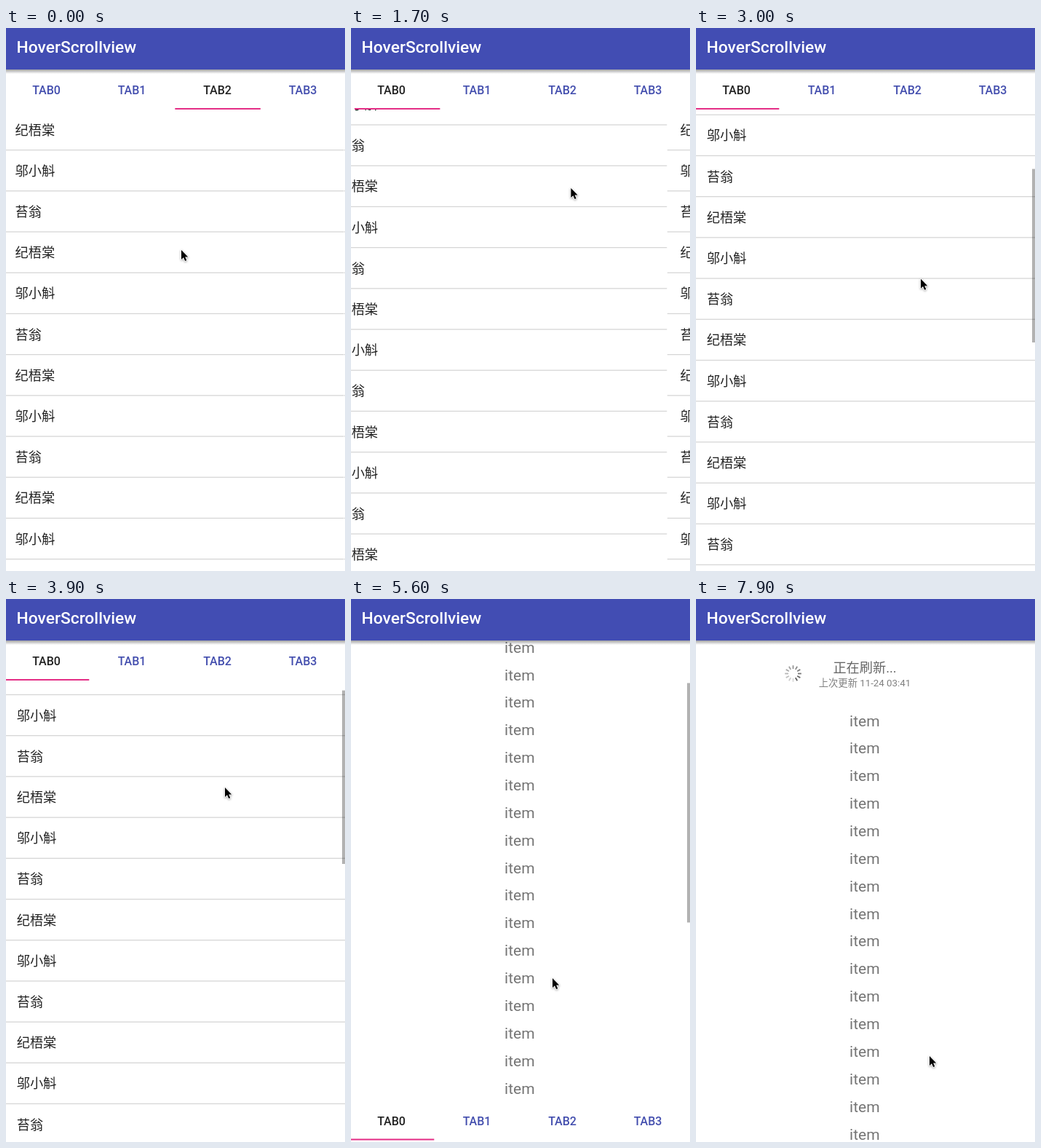
An HTML page with a canvas that plays this animation: 466 px wide and 746 px high, repeating every 8000 ms.

```html
<!DOCTYPE html>
<html lang="zh-CN">
<head>
<meta charset="utf-8">
<title>HoverScrollview</title>
<style>
  html, body { margin: 0; width: 100%; height: 100%; overflow: hidden; background: #fff; }
  canvas { display: block; width: 466px; height: 746px; }
</style>
</head>
<body>
<canvas id="stage" width="466" height="746"></canvas>
<script>
const W = 466, H = 746, LOOP = 8000, STEP = 100;
const BAR_H = 57, LIST_TOP = 112, ROW_H = 56.2, ROWS = 30;
const ITEM_H = 37.87, ITEMS = 20, MAX_SCROLL = 754;
const TAB_W = 117.5, PAGE_W = 470, EDGE = -3.2, REFRESH_H = 92;
const NAMES = ['纪梧棠', '邬小斛', '苔翁'];
const LATIN = 'Roboto, sans-serif';
const CJK = 'Roboto, "Noto Sans CJK SC", "Noto Sans CJK", sans-serif';

const ctx = document.getElementById('stage').getContext('2d');

// Progress from 0 to 1 between two times.
const linear = u => u;
const smooth = u => u * u * (3 - 2 * u);
const fling = u => 1 - (1 - u) ** 3;
function ramp(t, from, to, ease = linear) {
  return ease(Math.min(1, Math.max(0, (t - from) / (to - from))));
}

// Swipes move one page back each.
const pagerPosition = t =>
  3 - ramp(t, -600, 25, smooth) - ramp(t, 300, 900, smooth) - ramp(t, 1175, 1800, smooth);

const listScroll = t => 428 - 211 * ramp(t, 2100, 2800, fling) - 217 * ramp(t, 3300, 4020);

const outerScroll = t => MAX_SCROLL - 383 * ramp(t, 4000, 5000, fling)
  - 300 * ramp(t, 5200, 6100, fling) - 71 * ramp(t, 6300, 6500);

const pullDistance = t => 125 * ramp(t, 6500, 6900)
  - (125 - REFRESH_H) * ramp(t, 6900, 7200, fling);

const barAlpha = (t, shown, fading) => ramp(t, shown - 100, shown) * (1 - ramp(t, fading, fading + 280));

// Where the pointer presses and lets go: time, x, y.
const POINTER = [
  [0, 241, 304], [300, 150, 285], [700, 325, 250], [1200, 174, 254], [1800, 328, 212],
  [2100, 341, 190], [2400, 320, 367], [2900, 312, 425], [3300, 300, 100], [3900, 301, 258],
  [4500, 302, 575], [5200, 270, 340], [5600, 277, 520], [6300, 305, 330], [6900, 321, 627]
];

function pointerAt(t) {
  let [, x, y] = POINTER[0];
  for (let i = 1; i < POINTER.length; i++) {
    const [from, x0, y0] = POINTER[i - 1], [to, x1, y1] = POINTER[i];
    const u = ramp(t, from, to);
    x += (x1 - x0) * u;
    y += (y1 - y0) * u;
  }
  return [x, y];
}

function text(string, x, y, font, color, align = 'left') {
  ctx.font = font;
  ctx.fillStyle = color;
  ctx.textAlign = align;
  ctx.fillText(string, x, y);
}

function rect(x, y, w, h, color) {
  ctx.fillStyle = color;
  ctx.fillRect(x, y, w, h);
}

function scrollbar(x, top, view, content, scroll, alpha) {
  rect(x, top + scroll * view / content, 4, view * view / content, `rgba(0,0,0,${0.3 * alpha})`);
}

function drawList(page, shift, dx, t) {
  const top = LIST_TOP + shift, view = H - LIST_TOP;
  const scroll = page === 0 ? listScroll(t) : 0;
  ctx.save();
  ctx.beginPath();
  ctx.rect(dx + EDGE, top, PAGE_W, view);
  ctx.clip();
  for (let i = 0; i < ROWS; i++) {
    const y = top + i * ROW_H - scroll;
    text(NAMES[i % NAMES.length], 14.7 + dx, y + 34.6, `18.2px ${CJK}`, '#222');
    rect(dx + EDGE, y + ROW_H - 1.2, PAGE_W, 1.3, '#d6d6d6');
  }
  if (page === 0) scrollbar(462 + dx, top, view, ROWS * ROW_H, scroll, barAlpha(t, 2200, 4320));
  if (page === 1) scrollbar(462 + dx, top, view, ROWS * ROW_H, scroll, barAlpha(t, 700, 1500));
  ctx.restore();
}

function drawTabs(shift, pos) {
  rect(0, BAR_H + shift, W, LIST_TOP - BAR_H, '#fff');
  for (let i = 0; i < 4; i++) {
    const color = i === Math.round(pos) ? '#222' : '#434eae';
    text('TAB' + i, EDGE + (i + .5) * TAB_W, 91.3 + shift, `500 16px ${LATIN}`, color, 'center');
  }
  rect(EDGE + pos * TAB_W, 110 + shift, TAB_W, 2, '#e42e86');
}

function drawItems(offset) {
  for (let i = 0; i < ITEMS; i++) {
    text('item', 231.8, 82.5 + i * ITEM_H + offset, `21px ${LATIN}`, '#757575', 'center');
  }
}

function drawRefresh(offset, t) {
  const dy = offset - REFRESH_H;
  text('正在刷新...', 232, 100.5 + dy, `18.2px ${CJK}`, '#666', 'center');
  text('上次更新 11-24 03:41', 232, 120 + dy, `13.3px ${CJK}`, '#808080', 'center');
  if (t >= 6900) drawSpinner(133.5, 102.5 + dy, t / STEP + 10);
}

function drawSpinner(x, y, head) {
  ctx.save();
  ctx.translate(x, y);
  ctx.lineWidth = 1.8;
  for (let i = 0; i < 12; i++) {
    const age = ((head - i) % 12 + 12) % 12;
    const shade = 95 + age * 11;
    ctx.strokeStyle = `rgb(${shade},${shade},${shade})`;
    ctx.beginPath();
    ctx.moveTo(0, -6.5);
    ctx.lineTo(0, -11.3);
    ctx.stroke();
    ctx.rotate(Math.PI / 6);
  }
  ctx.restore();
}

function drawAppBar() {
  const shadow = ctx.createLinearGradient(0, BAR_H, 0, BAR_H + 6);
  shadow.addColorStop(0, 'rgba(0,0,0,.36)');
  shadow.addColorStop(1, 'rgba(0,0,0,0)');
  rect(0, BAR_H, W, 6, shadow);
  rect(0, 0, W, BAR_H, '#424db3');
  text('HoverScrollview', 14.6, 34, `500 22.8px ${LATIN}`, '#fff');
}

const arrow = new Path2D('M0 0V15.5L3.6 12.2L6.1 18L8.7 16.9L6.2 11.2H11Z');

function drawPointer(x, y) {
  ctx.save();
  ctx.translate(x, y + 1);
  ctx.scale(.84, .84);
  ctx.lineWidth = 1.8;
  ctx.lineJoin = 'round';
  ctx.strokeStyle = '#fff';
  ctx.shadowColor = 'rgba(0,0,0,.4)';
  ctx.shadowBlur = 3;
  ctx.shadowOffsetY = 1;
  ctx.stroke(arrow);
  ctx.shadowColor = 'transparent';
  ctx.fillStyle = '#000';
  ctx.fill(arrow);
  ctx.restore();
}

function draw(t) {
  const pos = pagerPosition(t);
  const scroll = outerScroll(t);
  const offset = pullDistance(t) - scroll;
  const shift = MAX_SCROLL + offset;
  const view = H - BAR_H;

  rect(0, 0, W, H, '#fff');
  for (let page = 0; page < 4; page++) {
    if (Math.abs(page - pos) < 1) drawList(page, shift, (page - pos) * PAGE_W, t);
  }
  drawItems(offset);
  if (offset > 0) drawRefresh(offset, t);
  drawTabs(shift, pos);
  scrollbar(462, BAR_H, view, view + MAX_SCROLL, scroll, barAlpha(t, 4000, 7100));
  drawAppBar();
  drawPointer(...pointerAt(t));
}

const start = performance.now();
function tick() {
  const t = (performance.now() - start) % LOOP;
  draw(Math.floor(t / STEP) * STEP);
  requestAnimationFrame(tick);
}
tick();
</script>
</body>
</html>
```
